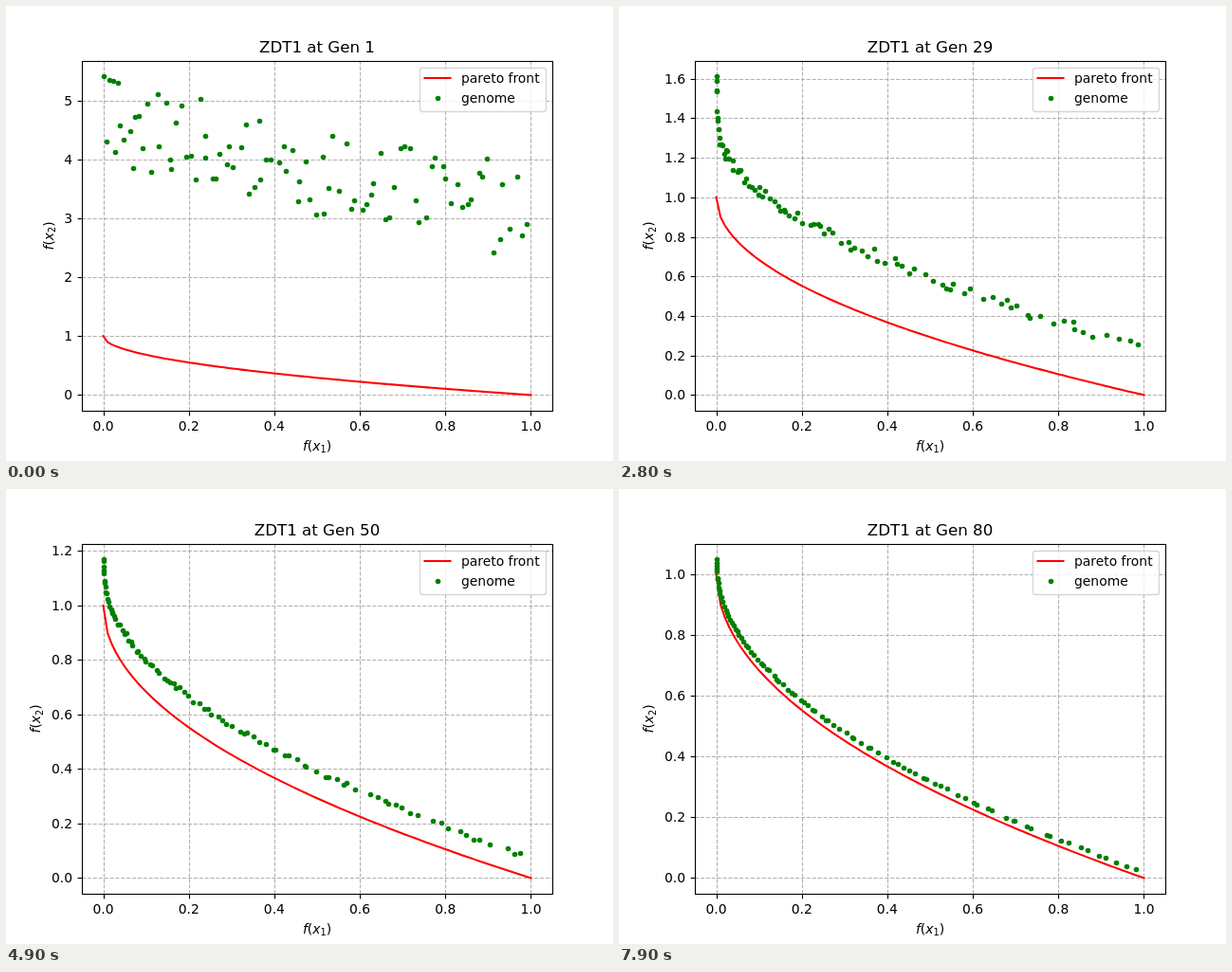
Recreate the animation shown at these times as an HTML page. Size 640 by 480 pixels, loop 8 s.

```html
<!DOCTYPE html>
<html lang="en">
<head>
<meta charset="utf-8">
<title>Evolving front</title>
<style>
  html, body { margin: 0; width: 100%; height: 100%; overflow: hidden; background: #fff; }
  svg { display: block; width: 640px; height: 480px; }
  text { font: 13.89px "DejaVu Sans", sans-serif; fill: #000; }
  .title { font-size: 16.67px; }
  .grid { stroke: #b0b0b0; stroke-width: 1.11; stroke-dasharray: 4.11 1.78; }
  .tick, .spine { stroke: #000; stroke-width: 1.11; fill: none; }
  .front { stroke: #f00; stroke-width: 2.08; fill: none; stroke-linejoin: round; stroke-linecap: square; }
  .dot { fill: #008000; }
  .italic { font-style: italic; }
  .sub { font-size: 9.72px; }
</style>
</head>
<body>
<svg id="plot" viewBox="0 0 640 480"></svg>
<script>
const plot = document.getElementById('plot');
const LEFT = 80, RIGHT = 576, TOP = 57.6, BOTTOM = 427.2;
const ZERO_X = 102.545, UNIT_X = 450.91, ZERO_Y = 410.4, DATA_HEIGHT = 336;
const DOTS = 92, GENERATIONS = 80, GEN_MS = 100, LIFETIME = 6;

// Highest f2 value at a few generations; it sets the vertical scale.
const peaks = [[1, 5.41], [14, 2.9], [19, 2.03], [22, 1.78], [28, 1.65],
  [36, 1.364], [50, 1.169], [66, 1.08], [80, 1.0487]];

const snap = v => Math.floor(v + 0.5) + 0.5;
const px = x => ZERO_X + x * UNIT_X;
const ideal = x => 1 - Math.sqrt(x);

function rand(a, b, c) {
  const v = Math.sin(a * 12.9898 + b * 78.233 + c * 37.719) * 43758.5453;
  return v - Math.floor(v);
}

function peakAt(gen) {
  const next = Math.max(1, peaks.findIndex(([g]) => g >= gen));
  const [g0, y0] = peaks[next - 1], [g1, y1] = peaks[next];
  return y0 * (y1 / y0) ** ((gen - g0) / (g1 - g0));
}

// The population sinks towards the front, from a loose cloud to a thin, even line.
function populationAt(gen) {
  const age = gen - 1;
  const settled = 1 - Math.exp(-age / 5);
  const gap = 3.95 * Math.exp(-0.2527 * age ** 0.673);
  return {
    gap,
    top: peakAt(gen),
    farGap: gap * (0.55 + 0.23 * Math.exp(-age / 30)),
    blur: gap * (0.2 - 0.12 * settled),
    skew: 1.15 + 0.95 * settled,
    clump: settled * Math.exp(-age / 25)
  };
}

function genomeAt(i, gen, { gap, top, farGap, blur, skew, clump }) {
  if (i === 0) return [0, top];
  // Each genome survives a few generations, then is replaced.
  const birth = Math.floor((gen + i * 2.618) / LIFETIME);
  const wave = 2 * Math.PI * 12;
  const even = (i + rand(i, birth, 1) - 0.5) / DOTS;
  const x = (even - clump * Math.sin(wave * even) / wave) ** skew;
  const rise = (top - 1 - gap) * Math.exp(-x / 0.003);
  const y = ideal(x) + gap + (farGap - gap) * x + rise + (2 * rand(i, birth, 2) - 1) * blur;
  return [x, y > top ? 2 * top - y : y];
}

const line = (cls, x1, y1, x2, y2) =>
  `<line class="${cls}" x1="${x1}" y1="${y1}" x2="${x2}" y2="${y2}"/>`;
const text = (x, y, anchor, body, extra = '') =>
  `<text x="${x}" y="${y}" text-anchor="${anchor}" ${extra}>${body}</text>`;
const dot = (x, y) => `<circle class="dot" cx="${x}" cy="${y}" r="2.78"/>`;
const objective = n => '<tspan class="italic">f</tspan>(<tspan class="italic">x</tspan>' +
  `<tspan class="sub" dy="2.2">${n}</tspan><tspan dy="-2.2">)</tspan>`;

function xAxis() {
  let grid = '', marks = '';
  for (let k = 0; k <= 5; k++) {
    const x = snap(px(k / 5));
    grid += line('grid', x, BOTTOM, x, TOP);
    marks += line('tick', x, 427.5, x, 432.4) + text(px(k / 5), 448, 'middle', (k / 5).toFixed(1));
  }
  return { grid, marks: marks + text(328, 469, 'middle', objective(1)) };
}

function yAxis(top, py) {
  const step = [0.2, 0.25, 0.5, 1].find(s => s >= top * 1.1 / 9);
  const digits = step === 1 ? 0 : step === 0.25 ? 2 : 1;
  let grid = '', marks = '';
  for (let k = 0; k * step <= top * 1.05; k++) {
    const y = snap(py(k * step));
    grid += line('grid', LEFT, y, RIGHT, y);
    marks += line('tick', 75.6, y, 80.5, y) + text(70, y + 4.5, 'end', (k * step).toFixed(digits));
  }
  const labelWidth = 8.84 * (digits + 1) + (digits ? 4.42 : 0);
  const x = 58.4 - labelWidth;
  marks += text(0, 0, 'middle', objective(2), `transform="translate(${x} 242.4) rotate(-90)"`);
  return { grid, marks };
}

function front(py) {
  const points = Array.from({ length: 100 }, (_, k) =>
    `${px(k / 99).toFixed(2)},${py(ideal(k / 99)).toFixed(2)}`);
  return `<polyline class="front" points="${points.join(' ')}"/>`;
}

const legend =
  '<rect x="436.5" y="65.5" width="133" height="46" rx="2.8" fill="#fff" fill-opacity=".8" ' +
  'stroke="#ccc" stroke-opacity=".8" stroke-width="1.39"/>' +
  line('front', 441.5, 76, 468.5, 76) + text(480, 81, 'start', 'pareto front') +
  dot(455.5, 97.5) + text(480, 102, 'start', 'genome');
const horizontal = xAxis();

function draw(gen) {
  const population = populationAt(gen);
  const py = y => ZERO_Y - y / population.top * DATA_HEIGHT;
  const vertical = yAxis(population.top, py);
  let dots = '';
  for (let i = 0; i < DOTS; i++) {
    const [x, y] = genomeAt(i, gen, population);
    dots += dot(snap(px(x)), snap(py(y)));
  }
  plot.innerHTML = horizontal.grid + vertical.grid + front(py) + dots +
    '<rect class="spine" x="80.5" y="58.5" width="496" height="369"/>' +
    horizontal.marks + vertical.marks +
    text(328, 49, 'middle', `ZDT1 at Gen ${gen}`, 'class="title"') + legend;
}

let shown = 0;
const start = performance.now();
function tick() {
  const elapsed = performance.now() - start;
  const gen = Math.floor(elapsed / GEN_MS) % GENERATIONS + 1;
  if (gen !== shown) draw(shown = gen);
  requestAnimationFrame(tick);
}
tick();
</script>
</body>
</html>
```
